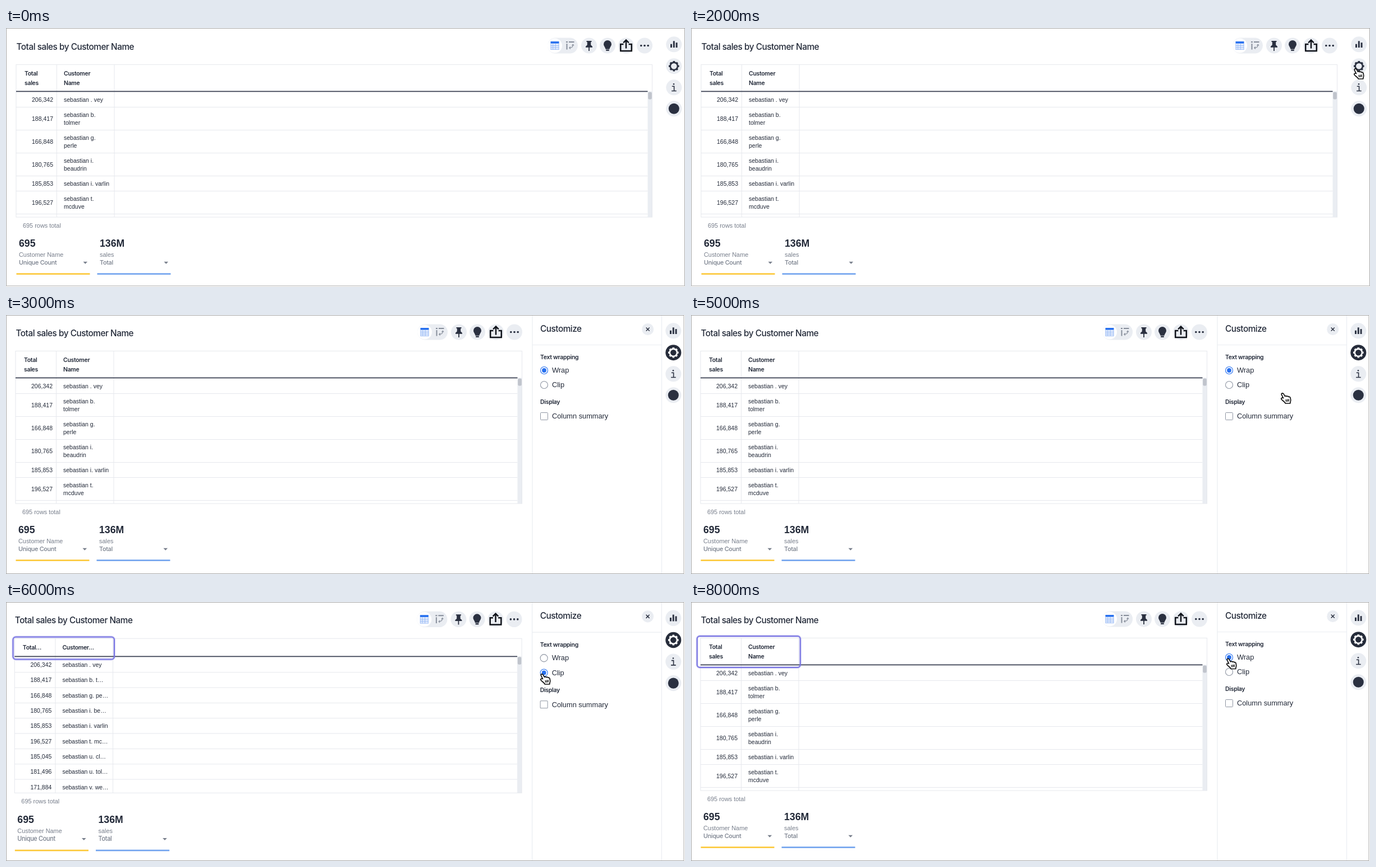
An HTML page for the animation above (9000 ms loop, 1210x463 px).

```html
<!DOCTYPE html>
<html lang="en">
<head>
<meta charset="utf-8">
<title>Table text wrapping</title>
<style>
  html, body { margin: 0; width: 100%; height: 100%; overflow: hidden; background: #fff; }
  svg { display: block; width: 1210px; height: 463px; }
  text { font-family: "Liberation Sans", Arial, sans-serif; font-size: 10.5px; fill: #222938; white-space: pre; }
  .title, .head, .medium { font-family: Inter, sans-serif; letter-spacing: -.03em; }
  .title { font-size: 15.3px; font-weight: 500; }
  .head { font-weight: 600; }
  .big { font-size: 17.7px; font-weight: bold; }
  .muted { font-size: 10.9px; fill: #777e8b; }
  .medium { font-weight: 500; }
  .option { font-size: 12.8px; }
  .num { text-anchor: end; }
</style>
</head>
<body>
<svg id="stage" viewBox="0 0 1210 463" xmlns="http://www.w3.org/2000/svg"></svg>
<script>
const INK = '#2a3040', PALE = '#eaedf2', LINE = '#e6e8ed', BLUE = '#2770ef';
const STEP_MS = 1000;

const rows = [
  ['206,342', 'sebastian . vey'],
  ['188,417', 'sebastian b.', 'tolmer', 't…'],
  ['166,848', 'sebastian g.', 'perle', 'pe…'],
  ['180,765', 'sebastian i.', 'beaudrin', 'be…'],
  ['185,853', 'sebastian i. varlin'],
  ['196,527', 'sebastian t.', 'mcduve', 'mc…'],
  ['185,045', 'sebastian u.', 'clore', 'cl…'],
  ['181,496', 'sebastian u.', 'tolvane', 'tol…'],
  ['171,884', 'sebastian v.', 'wendrick', 'we…']
];

const steps = [
  {},
  { cursor: [917, 360] },
  { cursor: [1180, 71] },
  { panel: true },
  { panel: true, mark: [936.5, 56.5, 100, 82] },
  { panel: true, cursor: [1050, 138] },
  { panel: true, clip: true, cursor: [951, 127], mark: [12.5, 62.5, 180.5, 40] },
  { panel: true, clip: true, cursor: [1016, 110.5] },
  { panel: true, cursor: [953, 99.5], mark: [10.8, 61, 184, 56] }
];

const text = (x, y, s, cls = '') => `<text x="${x}" y="${y}" class="${cls}">${s}</text>`;
const rect = (x, y, w, h, fill, extra = '') =>
  `<rect x="${x}" y="${y}" width="${w}" height="${h}" fill="${fill}" ${extra}/>`;
const path = (d, stroke, width = 1, fill = 'none', extra = '') =>
  `<path d="${d}" stroke="${stroke}" stroke-width="${width}" fill="${fill}" ${extra}/>`;
const disc = (x, y, r, fill, extra = '') => `<circle cx="${x}" cy="${y}" r="${r}" fill="${fill}" ${extra}/>`;
const at = (x, y, body) => `<g transform="translate(${x} ${y})">${body}</g>`;
const button = (x, y, icon, fill = PALE) => at(x, y, disc(0, 0, 14, fill) + icon);

const gear = color =>
  disc(0, 0, 6.6, 'none', `stroke="${color}" stroke-width="2.6"`) +
  disc(0, 0, 8.2, 'none', `stroke="${color}" stroke-width="2.2" pathLength="80" stroke-dasharray="5.4 4.6" stroke-dashoffset="2.7"`);

const icons = {
  pin: path('M-4.5-8.5h9v2h-1.3v5.3l2.8 2.6v1.8H-6V1.4l2.8-2.6v-5.3h-1.3z', 'none', 0, INK) +
    path('M0 2v7.5', INK, 1.8),
  bulb: path('M-3.6 6.2C-3.6 3.4-7 .6-7-2.6a7 6.8 0 0 1 14 0C7 .6 3.6 3.4 3.6 6.2z', 'none', 0, INK) +
    path('M-2.8 8.2h5.6', INK, 2.4),
  share: path('M-4.6-2.5h-5.2v12H9.8v-12H4.6M0 5V-9M-4.8-5.2 0-10l4.8 4.8', '#10131a', 2.5),
  dots: [-6.2, 0, 6.2].map(x => disc(x, 0, 1.8, INK)).join(''),
  bars: rect(-6.3, -.6, 2.9, 6.3, INK) + rect(-1.5, -6, 2.9, 11.7, INK) + rect(3.3, -3.2, 2.9, 8.9, INK),
  info: disc(-.3, -6, 1.3, INK) + path('M-3.5-2H.3V6.2M-4.2 6.2h8.6', INK, 1.6),
  mark: disc(0, 0, 9.5, INK)
};

function viewSwitch() {
  return at(760, 30.5,
    rect(-27, -14, 54, 28, PALE, 'rx="14"') + disc(-14, 0, 13, '#fff') +
    rect(-21.5, -7.5, 15, 15, '#e4edfd') + rect(-21.5, -7.5, 15, 3.6, BLUE) +
    path('M-21-3.5v10.7M-17.3-3.5v10.7M-12.8-3.5v10.7M-7-3.5v10.7M-21.5 0h15M-21.5 3.5h15M-21.5 7h15', '#8fb3f4', .8) +
    path('M6-6.5h3M11-6.5h9.5M7.5-3.5V7', '#858c99', 1.9) +
    path('M18.3-1.8C18.3 2 16 4 12 4M16.5-.2l1.8-2 1.8 2M13.8 2 11.8 4l2 2', '#858c99', 1.1));
}

function toolbar(shift) {
  return at(shift, 0, viewSwitch() + button(807, 30.5, icons.pin) + button(840, 30.5, icons.bulb) +
    button(873, 30.5, icons.share) + button(906, 30.5, icons.dots));
}

function table(right, clip) {
  const line = clip ? 96.1 : 112.4, inner = right - 8;
  let y = line + 1.1, body = '';
  rows.forEach(([sum, first, last, short]) => {
    const tall = last && !clip, height = tall ? 41 : 27, base = y + height / 2 + 3.9;
    body += text(83, base, sum, 'num');
    if (tall) body += text(102, base - 7, first) + text(102, base + 7, last);
    else body += text(102, base, last ? `${first} ${short}` : first);
    y += height;
    body += path(`M17 ${y}H${inner}`, LINE);
  });
  const head = clip
    ? text(31.5, 84, 'Total…', 'head') + text(102, 84, 'Customer…', 'head')
    : text(32, 83.7, 'Total', 'head') + text(32, 100.5, 'sales', 'head') +
      text(102, 83.7, 'Customer', 'head') + text(102, 100.5, 'Name', 'head');
  return `<clipPath id="body"><rect x="0" y="60" width="${right}" height="277"/></clipPath>` +
    `<g clip-path="url(#body)">${body}</g>` + head +
    path('M89.5 64V337M192 64V337', LINE) +
    rect(inner, line, 8, 337 - line, PALE) +
    rect(inner + .7, line + 1, 6.6, 13.2, '#c0c4cc', 'rx="2.5"') +
    rect(17, 64.4, right - 17, 272.7, 'none', `stroke="${LINE}"`) +
    path(`M17 ${line}H${inner}`, '#3a4052', 1.8);
}

function summary(x, value, label, kind, color) {
  return text(x, 390, value, 'big') + text(x, 407.5, label, 'muted') +
    text(x, 422, kind, 'muted medium') +
    path(`M${x + 114.5} 416.8h7.6l-3.8 3.9z`, 'none', 0, '#777e8b') +
    rect(x - 4.5, 437.3, 131, 2.6, color);
}

function radio(y, label, on) {
  return disc(959, y, 6.5, '#fff', `stroke="${on ? BLUE : '#8f96a3'}" stroke-width="1.1"`) +
    (on ? disc(959, y, 3.9, BLUE) : '') + text(973, y + 4, label, 'option');
}

function panel(clip) {
  return path('M938 0V463M1168.5 0V463M938 53.5H1168', PALE, 1.2) +
    text(952, 29.7, 'Customize', 'title') +
    at(1143.7, 25.5, disc(0, 0, 10.5, PALE) + path('M-3-3 3 3M3-3-3 3', INK, 1.5)) +
    text(952, 78.7, 'Text wrapping', 'head') + radio(99, 'Wrap', !clip) + radio(125, 'Clip', clip) +
    text(952, 158.7, 'Display', 'head') +
    rect(952.5, 174.5, 13, 13, '#fff', 'stroke="#8f96a3" rx="1"') + text(973, 185.4, 'Column summary', 'option');
}

function rail(active) {
  return button(1189.3, 28.3, icons.bars) +
    button(1189.3, 67.2, gear(active ? '#fff' : INK), active ? '#262c3a' : PALE) +
    button(1189.3, 105.3, icons.info) + button(1189.3, 143.3, icons.mark);
}

function hand([x, y]) {
  return at(x, y,
    path('M2.3 4.2C1.8 1.8 4.9.9 6.1 3.1L8.5 7.3C9.6 6.1 11.2 6.4 11.8 7.7 13 6.7 14.5 7.2 15 8.4c1.5-.6 2.8.2 3.1 1.7l.6 3.8c.2 2.4-1 3.6-1 6.1H9.2C8.7 17.6 5 15.9 2.5 13 .8 10.9 2.8 9.1 5.5 10.6z',
      '#111', 1.7, '#fff', 'stroke-linejoin="round"') +
    path('M10.2 12.8l.5 4.2M12.7 12.5l.3 4.4M15.1 12.3l.1 4.2', '#111', 1.4));
}

function highlight([x, y, w, h]) {
  const box = extra => rect(x, y, w, h, 'none', `rx="5" ${extra}`);
  return box('stroke="#7773dd" stroke-opacity=".25" stroke-width="4.4"') + box('stroke="#7773e2" stroke-width="2"');
}

function scene({ panel: open = false, clip = false, cursor, mark }) {
  const matrix = !open ? '1 0 0 1 1 1' : clip ? '1.0014 0 0 1.0125 -1.7 0' : '1 0 0 1 0 0';
  const shift = open ? 0 : 231;
  return rect(0, 0, 1210, 463, '#fff') +
    `<g transform="matrix(${matrix})">` +
    text(17.5, 37.7, 'Total sales by Customer Name', 'title') +
    toolbar(shift) + table(919.5 + shift, clip) +
    text(29, 356, '695 rows total', 'muted') +
    summary(22, '695', 'Customer Name', 'Unique Count', '#fcc838') +
    summary(166, '136M', 'sales', 'Total', '#71a3ee') +
    (open ? panel(clip) : '') + rail(open) + '</g>' +
    rect(.5, .5, open ? 1207.5 : 1209, open ? 462 : 460.5, 'none', 'stroke="#a8a8a8"') +
    (mark ? highlight(mark) : '') + (cursor ? hand(cursor) : '');
}

const stage = document.getElementById('stage');
let shown = -1;

function render(now) {
  const index = Math.floor(now / STEP_MS) % steps.length;
  if (index !== shown) {
    stage.innerHTML = scene(steps[index]);
    shown = index;
  }
}

function tick() {
  render(performance.now());
  requestAnimationFrame(tick);
}
tick();
</script>
</body>
</html>
```
